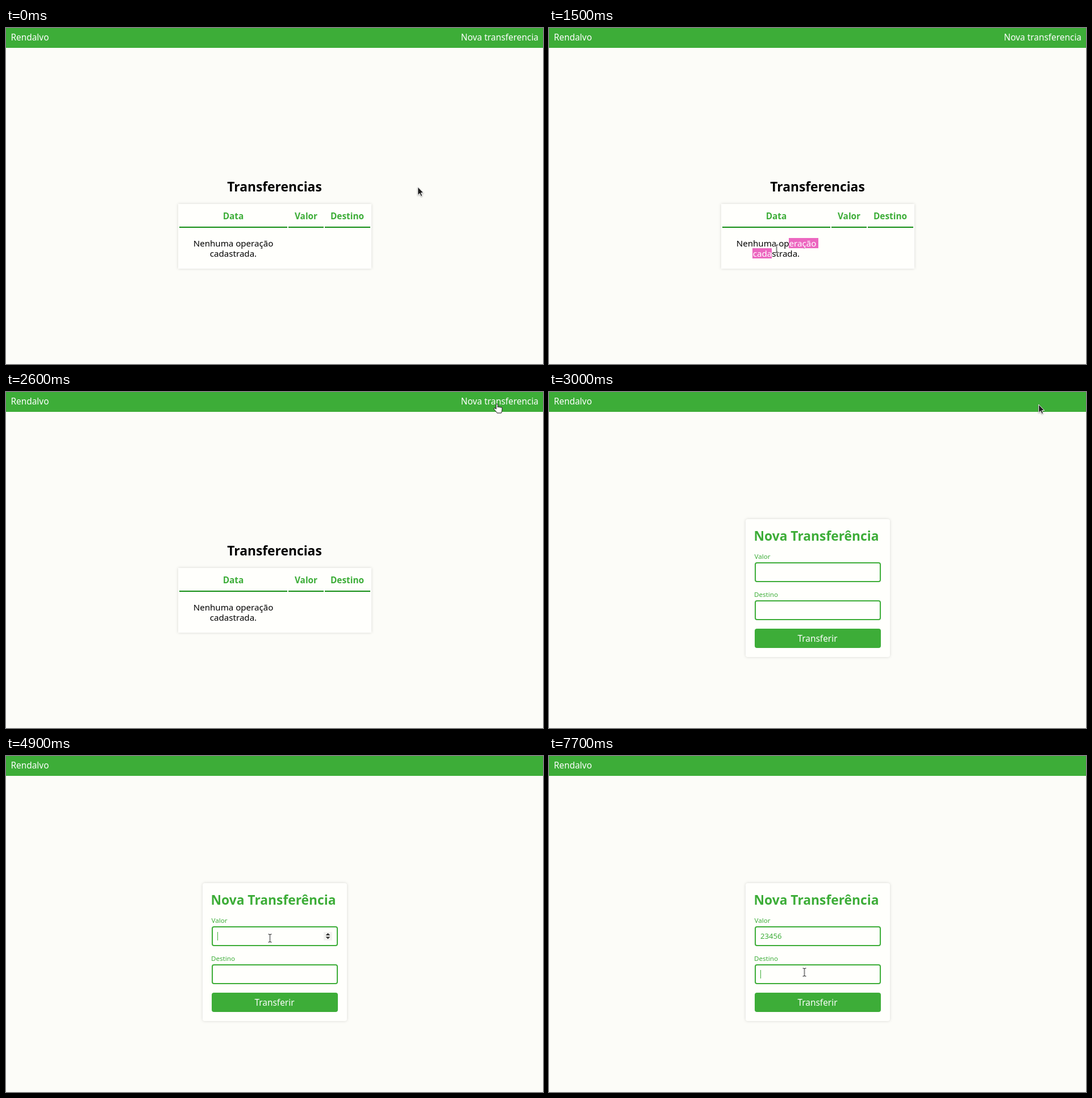
An HTML page that plays this animation: 945 by 592 pixels, repeating every 8 s.

```html
<!DOCTYPE html>
<html lang="pt-BR">
<head>
<meta charset="utf-8">
<title>Transferencias</title>
<style>
  :root { --green: #3dad38; --card: #fffffc; }
  html, body { margin: 0; width: 945px; height: 592px; overflow: hidden; background: #fcfcf8; }
  body { position: relative; font-family: "Noto Sans", "Open Sans", sans-serif; }
  svg { position: absolute; left: 0; top: 0; display: block; }
  text { font-size: 15.4px; }
  .mid { text-anchor: middle; }
  .bold { font-weight: 700; }
  .white { fill: #fff; }
  .green { fill: var(--green); }
  .cell { font-size: 15.1px; text-anchor: middle; }
  .label { font-size: 11.6px; }
  .title { font-size: 22.8px; font-weight: 700; }
  .card { fill: var(--card); filter: drop-shadow(0 0 2.5px rgba(0, 0, 0, .15)); }
  .field { fill: var(--card); stroke: var(--green); stroke-width: 2; }
  .rule { fill: #118c11; }
  .pink { fill: #ec67c0; }

  /* One shared 8 s clock, hard changes by default */
  .anim { animation: 8s step-end infinite; }
  #list { animation-name: list; }
  #form { animation-name: form; }
  #sel1 { animation-name: sel1; }
  #sel2 { animation-name: sel2; }
  #spin { animation-name: spin; }
  #caret2 { animation-name: caret2; }
  #cursor { animation-name: move; }
  #arrow { animation-name: arrow; filter: drop-shadow(0 1px 1px rgba(0, 0, 0, .35)); }
  #beam { animation-name: beam; }
  #hand { animation-name: hand; }

  /* The right border is the caret; 1ch is one digit */
  #typed {
    position: absolute; left: 372px; top: 310px; height: 15px; width: 0;
    overflow: hidden; white-space: nowrap; border-right: 1px solid transparent;
    font-size: 13.1px; line-height: 15px; color: var(--green);
    animation-name: type, blink;
  }

  @keyframes list { 0% { opacity: 1 } 37.5%, 100% { opacity: 0 } }
  @keyframes form { 0% { opacity: 0 } 37.5%, 100% { opacity: 1 } }
  @keyframes sel1 { 0% { opacity: 0 } 17.5% { opacity: 1 } 21.25%, 100% { opacity: 0 } }
  @keyframes sel2 { 0% { opacity: 0 } 18.75% { opacity: 1 } 21.25%, 100% { opacity: 0 } }
  @keyframes spin { 0% { opacity: 0 } 45% { opacity: 1 } 96.25%, 100% { opacity: 0 } }
  @keyframes caret2 { 0% { opacity: 0 } 96.25%, 100% { opacity: 1 } }

  @keyframes type {
    0% { width: 0 }
    67.5% { width: 1ch }
    68.75% { width: 2ch }
    71.25% { width: 3ch }
    76.25% { width: 4ch }
    78.75%, 100% { width: 5ch }
  }
  @keyframes blink {
    0%, 53.75%, 86.25%, 96.25%, 100% { border-color: transparent }
    50%, 61.25%, 92.5% { border-color: var(--green) }
  }

  @keyframes move {
    0% { transform: translate(724px, 279px) }
    6.25% { transform: translate(724px, 279px); animation-timing-function: steps(9, start) }
    17.499% { transform: translate(405px, 385px) }
    17.5% { transform: translate(484px, 381px) }
    18.75% { transform: translate(400.5px, 389px) }
    20% { transform: translate(394.5px, 402px) }
    21.25% { transform: translate(392px, 407px) }
    22.5% { transform: translate(390px, 411px) }
    25% { transform: translate(390px, 411px); animation-timing-function: steps(5, start) }
    31.25% { transform: translate(850px, 56px) }
    32.5% { transform: translate(861px, 21px) }
    41.25% { transform: translate(593px, 232px) }
    43.75% { transform: translate(510px, 283px) }
    45% { transform: translate(464.5px, 321px) }
    92.5% { transform: translate(460.5px, 329px) }
    93.75% { transform: translate(451px, 362px) }
    96.25%, 100% { transform: translate(449.5px, 381px) }
  }
  @keyframes arrow {
    0%, 21.25%, 37.5%, 93.75% { opacity: 1 }
    15%, 32.5%, 45%, 96.25%, 100% { opacity: 0 }
  }
  @keyframes beam {
    0%, 21.25%, 93.75% { opacity: 0 }
    15%, 45%, 96.25%, 100% { opacity: 1 }
  }
  @keyframes hand { 0%, 37.5%, 100% { opacity: 0 } 32.5% { opacity: 1 } }
</style>
</head>
<body>
<svg width="945" height="592" viewBox="0 0 945 592">
  <rect class="green" width="945" height="35"/>
  <text class="white" x="8.5" y="22">Rendalvo</text>

  <g id="list" class="anim">
    <text class="white" x="937" y="22" text-anchor="end">Nova transferencia</text>
    <text class="mid title" x="472.5" y="288">Transferencias</text>
    <rect class="card" x="303" y="310" width="340" height="114"/>
    <g class="mid bold green">
      <text x="400" y="337">Data</text>
      <text x="528" y="337">Valor</text>
      <text x="600.5" y="337">Destino</text>
    </g>
    <g class="rule">
      <rect x="305" y="350" width="190" height="2"/>
      <rect x="497" y="350" width="62" height="2"/>
      <rect x="561" y="350" width="80" height="2"/>
    </g>
    <text class="cell" x="400" y="385">Nenhuma operação</text>
    <text class="cell" x="400" y="403">cadastrada.</text>
    <g id="sel1" class="anim">
      <rect class="pink" x="422" y="370" width="52" height="18"/>
      <text class="cell white" x="400" y="385"><tspan fill="none">Nenhuma op</tspan>eração</text>
    </g>
    <g id="sel2" class="anim">
      <rect class="pink" x="358" y="388" width="34" height="18"/>
      <text class="cell white" x="400" y="403">cada<tspan fill="none">strada.</tspan></text>
    </g>
  </g>

  <g id="form" class="anim">
    <rect class="card" x="346" y="224" width="254" height="243" rx="4"/>
    <text class="title green" x="360.5" y="262">Nova Transferência</text>
    <text class="label green" x="361.5" y="294">Valor</text>
    <rect class="field" x="363" y="301" width="220" height="33" rx="3"/>
    <text class="label green" x="361" y="361">Destino</text>
    <rect class="field" x="363" y="368" width="220" height="33" rx="3"/>
    <rect class="green" x="362" y="417" width="222" height="34" rx="4"/>
    <text class="mid white" x="472.5" y="440">Transferir</text>
    <g id="spin" class="anim">
      <rect x="559" y="310" width="15" height="15" fill="#f3f3f0"/>
      <path d="M562.5 316l4-4 4 4zM562.5 318.5l4 4 4-4z" fill="#333"/>
    </g>
    <rect id="caret2" class="anim green" x="372" y="377" width="1" height="15"/>
  </g>
</svg>

<div id="typed" class="anim">23456</div>

<svg width="945" height="592" viewBox="0 0 945 592">
  <defs>
    <path id="bar" d="M-3-7H-1L0-6 1-7H3M0-6V6M-3 7H-1L0 6 1 7H3"/>
  </defs>
  <g id="cursor" class="anim">
    <path id="arrow" class="anim" d="M.7 1V15.6L4 12.5 6.3 17.6 8.7 16.5 6.4 11.5H10.8Z" fill="#1c1c1c" stroke="#fff"/>
    <g id="beam" class="anim" fill="none">
      <use href="#bar" stroke="#fff" stroke-width="2.6"/>
      <use href="#bar" stroke="#111"/>
    </g>
    <path id="hand" class="anim" fill="#fff" stroke="#111" stroke-linejoin="round"
      d="M1.5 9V1.4a1.4 1.4 0 0 1 2.8 0V6a1.3 1.3 0 0 1 2.6.3 1.3 1.3 0 0 1 2.6.4 1.2 1.2 0 0 1 2.5.6V11c0 2-1 3-1.4 5H3.2C2 13.5 0 12-2.2 9.2-3 7.8-1.4 6.8 0 7.8Z"/>
  </g>
</svg>
</body>
</html>
```
